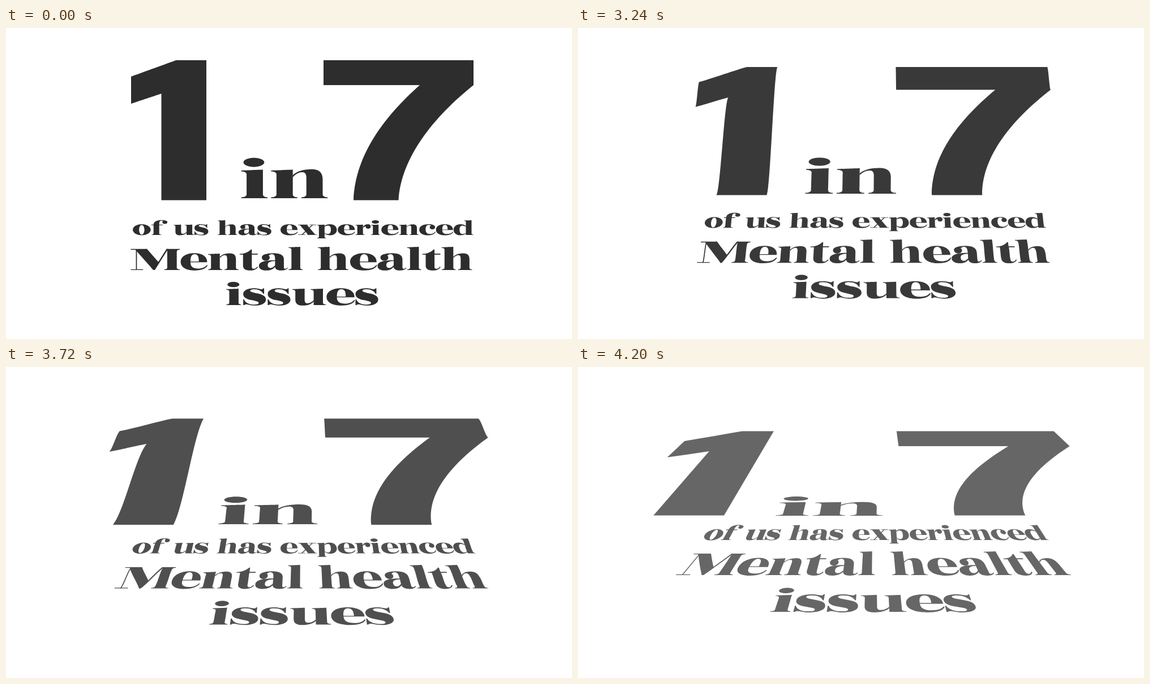
An HTML page with a canvas that plays this animation: 1000x550 px, repeating every 4.22 s.

```html
<!DOCTYPE html>
<html lang="en">
<head>
<meta charset="utf-8">
<title>1 in 7</title>
<style>
  html, body { margin: 0; width: 100%; height: 100%; overflow: hidden; background: #fff; }
  canvas { display: block; width: 100%; height: 100%; }
</style>
</head>
<body>
<canvas id="stage" role="img" aria-label="1 in 7 of us has experienced Mental health issues"></canvas>
<script>
const W = 1000, H = 550, LOOP = 4220, HOLD = 3000, STEP = 20, STEPS = 61;
const lerp = (a, b, t) => a + (b - a) * t;

// Lettering parts: baseline 0, x-height 67, ascender 95, y points up.
const bar = (x1, x2, y1, y2) => `M${x1} ${y1} L${x2} ${y1} L${x2} ${y2} L${x1} ${y2} Z`;

function oval(x, y, rx, ry) {
  const a = rx * 0.5523, b = ry * 0.5523;
  return `M${x + rx} ${y} C${x + rx} ${y + b} ${x + a} ${y + ry} ${x} ${y + ry} ` +
    `C${x - a} ${y + ry} ${x - rx} ${y + b} ${x - rx} ${y} ` +
    `C${x - rx} ${y - b} ${x - a} ${y - ry} ${x} ${y - ry} ` +
    `C${x + a} ${y - ry} ${x + rx} ${y - b} ${x + rx} ${y} Z`;
}

const stem = (top, foot = 0) =>
  `M0 ${foot} L58 ${foot} L58 ${foot + 2} Q48 ${foot + 3} 48 ${foot + 9} L48 ${top} ` +
  `L0 ${top - 2} L0 ${top - 4} Q12 ${top - 5} 12 ${top - 11} ` +
  `L12 ${foot + 9} Q12 ${foot + 3} 0 ${foot + 2} Z`;

const rightStem = (x, top) =>
  `M${x} 0 L${x + 48} 0 L${x + 48} 2 Q${x + 36} 3 ${x + 36} 9 L${x + 36} ${top} ` +
  `L${x - 12} ${top - 2} L${x - 12} ${top - 4} Q${x} ${top - 5} ${x} ${top - 11} Z`;

const arch = "M67 0 L125 0 L125 2 Q114 3 114 9 L114 44 Q114 68 90 68 Q62 68 48 54 " +
  "L48 49 Q58 61 69 61 Q78 61 78 48 L78 9 Q78 3 67 2 Z";

// letter: [advance, ...parts]
const glyphs = {
  i: [66, stem(67), oval(28, 84.2, 23, 10.8)],
  l: [62, stem(95)],
  n: [129, stem(67), arch],
  h: [132, stem(95), arch],
  o: [118, oval(57, 33.5, 57, 35.5) + oval(57, 33.5, 17, 31.5)],
  u: [133, rightStem(83, 67),
    "M48 67 L0 65 L0 63 Q12 62 12 56 L12 22 Q12 -2 40 -2 Q68 -2 83 14 L83 20 Q72 7 58 7 Q48 7 48 20 Z"],
  e: [112, "M108 34 C108 56 88 69 56 69 C22 69 0 55 0 33 C0 12 22 -2 58 -2 C90 -2 106 8 110 20 " +
    "L107 21 C100 11 88 6 72 6 C50 6 40 14 40 32 L108 32 Z" +
    "M40 35 C40 56 46 65 57 65 C69 65 75 56 74 35 Z"],
  c: [106, "M100 50 C100 62 84 69 58 69 C22 69 0 55 0 33 C0 12 22 -2 56 -2 C84 -2 99 8 104 20 " +
    "L101 21 C94 11 84 6 72 6 C50 6 40 16 40 36 C40 56 48 65 60 65 C66 65 70 64 72 61 Z",
    oval(83, 49, 17, 13)],
  a: [121, "M12 50 C12 62 30 69 60 69 C88 69 102 61 102 44 L102 11 Q102 5 107 5 Q113 5 116 10 " +
    "L119 9 Q112 -2 92 -2 Q68 -2 66 12 L66 46 Q66 65 54 65 Q46 65 42 61 Z",
    "M67 40 C30 40 0 35 0 17 C0 4 14 -2 30 -2 C48 -2 60 5 67 14 L67 20 " +
    "C60 12 54 8 48 8 C40 8 36 12 36 20 C36 32 46 36 67 37 Z",
    oval(28, 51, 16, 13)],
  t: [79, "M50 67 L74 67 L74 63 L50 63 L50 14 Q50 5 58 5 Q66 5 72 14 L75 12 Q66 -2 44 -2 " +
    "Q14 -2 14 18 L14 63 L0 63 L0 66 Q30 67 46 84 L50 84 Z"],
  s: [95, "M0 0 L0 24 L3 24 C8 10 22 2 42 2 C54 2 60 4 60 9 C60 14 50 16 34 20 C11 25 0 32 0 46 " +
    "C0 60 18 69 40 69 C56 69 64 65 72 65 Q76 65 78 69 L81 69 L81 46 L78 46 " +
    "C72 58 60 65 42 65 C32 65 27 63 27 59 C27 54 36 52 53 48 C77 43 88 36 88 22 " +
    "C88 6 68 -2 46 -2 C28 -2 20 3 12 3 Q7 3 4 0 Z"],
  f: [100, "M2 0 L64 0 L64 2 Q50 3 50 9 L50 63 L72 63 L72 67 L50 67 C50 85 54 92 64 92 Q70 92 74 89 " +
    "L102 83 C100 91 84 96 66 96 C36 96 14 87 14 67 L0 67 L0 63 L14 63 L14 9 Q14 3 2 2 Z",
    oval(86, 82, 16, 11)],
  x: [120, "M10 66 L56 66 L110 1 L64 1 Z", "M20 1 L88 66 L95 66 L28 1 Z",
    bar(0, 62, 64, 67), bar(72, 115, 64, 67), bar(0, 45, 0, 3), bar(56, 119, 0, 3)],
  p: [132, stem(67, -22),
    "M48 58 C56 65 68 69 82 69 C108 69 126 54 126 33 C126 12 108 -2 82 -2 C68 -2 56 2 48 9 " +
    "L48 14 C54 9 60 6 68 6 C82 6 88 16 88 34 C88 52 82 60 70 60 C62 60 54 57 48 52 Z"],
  d: [130, rightStem(78, 95),
    "M78 58 C70 65 58 69 44 69 C18 69 0 54 0 33 C0 12 18 -2 44 -2 C58 -2 70 2 78 9 " +
    "L78 14 C72 9 66 6 58 6 C44 6 38 16 38 34 C38 52 44 60 56 60 C64 60 72 57 78 52 Z"],
  r: [99, stem(67),
    "M48 52 C54 62 66 69 80 69 C92 69 97 62 97 52 L70 56 C60 56 52 52 48 44 Z",
    oval(81, 53, 16, 13)],
  M: [204, bar(0, 64, 83, 86), bar(0, 50, 0, 3), "M21 0 L25 0 L25 82 L21 82 Z",
    "M18 84 L66 86 L116 29 L98 0 L92 0 Z", "M92 0 L98 0 L153 86 L146 86 Z",
    "M146 86 L201 86 L201 83.5 Q188 83 188 76 L188 9 Q188 3 201 2 L201 0 L136 0 L136 2 Q149 3 149 9 L149 82 Z"]
};

// Each band leans: rows y0..y1 move to Y0..Y1 while widths scale by k0..k1 around c.
const warp = (c, C, y0, y1, Y0, Y1, k0, k1) => ([x, y]) => {
  const v = (y - y0) / (y1 - y0);
  return [C + (x - c) * lerp(k0, k1, v), lerp(Y0, Y1, v)];
};

const parts = [];

// Turns a path into cubic pieces, each with its first and last pose.
function addPart(path, place, bend) {
  const subs = [];
  let at, start, segs;
  const mix = (a, b, t) => [lerp(a[0], b[0], t), lerp(a[1], b[1], t)];
  const line = to => {
    const flat = [at, at, to, to];
    const even = [at, mix(at, to, 1 / 3), mix(at, to, 2 / 3), to];
    segs.push([flat, even.map(bend)]);
  };
  for (const [, op, args] of path.matchAll(/([MLQCZ])([^MLQCZ]*)/g)) {
    const n = (args.match(/-?[\d.]+/g) || []).map(Number);
    const pts = [];
    for (let i = 0; i < n.length; i += 2) pts.push(place(n[i], n[i + 1]));
    const end = pts[pts.length - 1];
    if (op === "M") {
      start = end;
      subs.push(segs = []);
    } else if (op === "Z") {
      line(start);
    } else if (op === "L") {
      line(end);
    } else {
      const [p, q] = op === "C" ? pts : [mix(at, pts[0], 2 / 3), mix(end, pts[0], 2 / 3)];
      const curve = [at, p, q, end];
      segs.push([curve, curve.map(bend)]);
    }
    at = end || start;
  }
  parts.push(subs);
}

function addWord(text, x, base, sx, sy, bend) {
  for (const ch of text) {
    const [advance, ...shapes] = glyphs[ch], left = x;
    for (const s of shapes) addPart(s, (u, v) => [left + u * sx, base - v * sy], bend);
    x += advance * sx;
  }
}

const asIs = (x, y) => [x, y];
const bigBend = warp(523, 523, 57, 304.5, 113.5, 262.5, 1.048, 1.568);
addPart("M300.5 57 L354 57 L354 304.5 L274.5 304.5 L274.5 116 L221 134 L221 86 Z", asIs, bigBend);
addPart("M561 57 L826 57 L826 101 C756 157 698 229 693.5 304.5 L614 304.5 " +
  "C617 225 668 157 731 101 L561 101 Z", asIs, bigBend);

addWord("in", 415.5, 301, 0.8, 0.753, warp(568, 538, 229.5, 301, 229, 263, 1.167, 1.237));

const row2 = warp(524, 524, 340, 366, 279.5, 306, 0.963, 1.02);
[["of", 224], ["us", 296], ["has", 374], ["experienced", 485]]
  .forEach(([w, x]) => addWord(w, x, 366, 0.278, 0.274, row2));

const row3 = warp(524, 524, 387, 428, 326, 368, 1.04, 1.158);
[["Mental", 220.5], ["health", 551]]
  .forEach(([w, x]) => addWord(w, x, 428, 0.432, 0.432, row3));

addWord("issues", 389, 490, 0.456, 0.432, warp(522.5, 521.5, 449, 490, 390.5, 433, 1.255, 1.365));

const canvas = document.getElementById("stage");
const ctx = canvas.getContext("2d");
const ratio = window.devicePixelRatio || 1;
canvas.width = W * ratio;
canvas.height = H * ratio;
ctx.scale(ratio, ratio);

function draw(p) {
  const g = Math.floor(lerp(45, 102, p));
  ctx.fillStyle = "#fff";
  ctx.fillRect(0, 0, W, H);
  ctx.fillStyle = `rgb(${g},${g},${g})`;
  for (const subs of parts) {
    ctx.beginPath();
    for (const segs of subs) {
      segs.forEach(([a, b], i) => {
        const q = a.map((pt, j) => [lerp(pt[0], b[j][0], p), lerp(pt[1], b[j][1], p)]);
        if (!i) ctx.moveTo(...q[0]);
        ctx.bezierCurveTo(...q[1], ...q[2], ...q[3]);
      });
      ctx.closePath();
    }
    ctx.fill("evenodd");
  }
}

const t0 = performance.now();
function tick() {
  const t = (performance.now() - t0) % LOOP;
  const step = t < HOLD ? 0 : Math.min(STEPS, Math.floor((t - HOLD) / STEP) + 1);
  draw(step / STEPS);
  requestAnimationFrame(tick);
}
tick();
</script>
</body>
</html>
```
